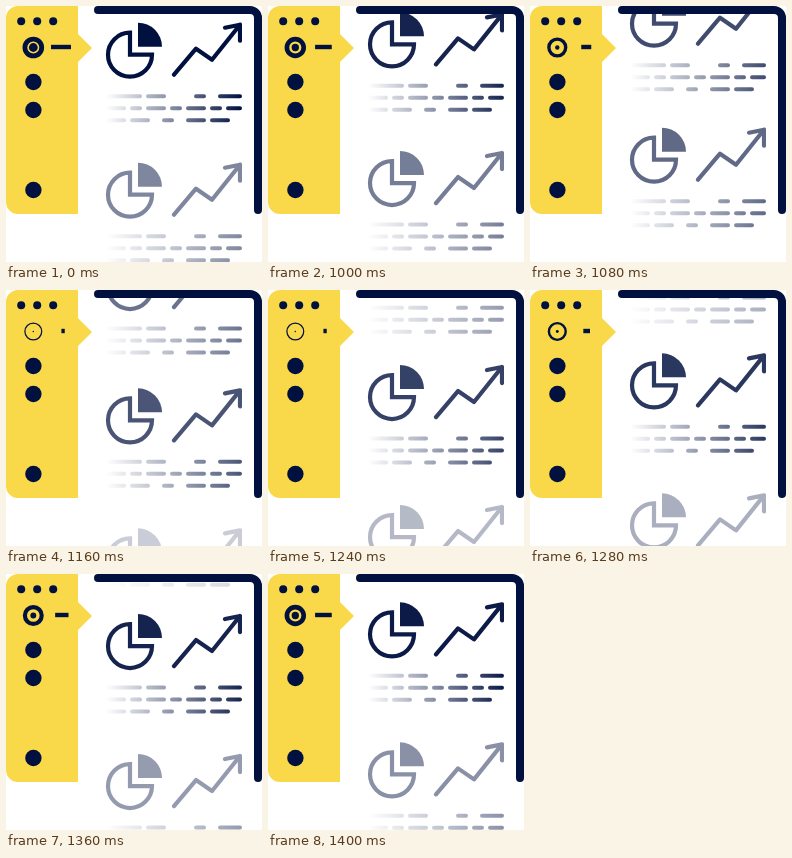
These frames come from a looping animation (256x256 px, 1440 ms). An HTML page with a canvas:

```html
<!DOCTYPE html>
<html lang="en">
<head>
<meta charset="utf-8">
<title>Scrolling report cards</title>
<style>
  html, body { margin: 0; width: 100%; height: 100%; overflow: hidden; background: #fff; }
  canvas { display: block; width: 256px; height: 256px; }
</style>
</head>
<body>
<canvas id="stage" width="256" height="256"></canvas>
<script>
const ctx = document.getElementById('stage').getContext('2d');
const NAVY = '#00103f';
const YELLOW = '#f9d949';

const LOOP = 1440, HOLD = 1000, STEP = 40, STEPS = 12;
const CARD_HEIGHT = 140;

const fade = ctx.createLinearGradient(100, 0, 236, 0);
fade.addColorStop(0, 'rgba(0, 16, 63, 0)');
fade.addColorStop(1, NAVY);

const lerp = (a, b, t) => a + (b - a) * t;

function circle(x, y, r) {
  ctx.beginPath();
  ctx.arc(x, y, r, 0, Math.PI * 2);
}

function disc(x, y, r) {
  circle(x, y, r);
  ctx.fill();
}

function strokePath(d, width) {
  ctx.lineWidth = width;
  ctx.stroke(new Path2D(d));
}

function drawIcons() {
  ctx.lineJoin = 'miter';
  strokePath('M124 48 V26 A22 22 0 1 0 146 48 Z', 4.2);
  ctx.fill(new Path2D('M132 40 V16 A24 24 0 0 1 156 40 Z'));
  ctx.lineJoin = 'round';
  strokePath('M168 68 L190 42 L206 53 L234 18 M219 21 L234 18 V34', 4.2);
}

// One row of placeholder text: a repeating dash pattern with round ends
function drawTextRow(y, pattern) {
  ctx.setLineDash(pattern);
  strokePath(`M102 ${y} H234`, 4);
}

function drawCard(y, alpha) {
  if (alpha <= 0) return;
  ctx.save();
  ctx.beginPath();
  ctx.rect(88, 8, 148, 248);
  ctx.clip();
  ctx.globalAlpha = alpha;

  ctx.translate(0, y + 0.7);
  drawIcons();

  ctx.translate(0, -0.5);
  ctx.strokeStyle = fade;
  drawTextRow(90, [32, 8, 16, 32, 8, 16]);
  drawTextRow(102, [16, 8, 8, 8]);
  drawTextRow(114, [16, 8, 16, 16, 8, 16]);
  ctx.restore();
}

// The ring and dash shrink to nothing and grow back
function drawMarker(size) {
  if (size <= 0) return;
  const x = 27.3, y = 41.5;
  disc(x, y, 4.4 * size);
  ctx.lineWidth = 4.8 * Math.sin(size * Math.PI / 2);
  circle(x, y, 8.4);
  ctx.stroke();
  ctx.fillRect(lerp(57.5, 45, size), 38.8, 20 * size, 4.4);
}

function drawPanel(size) {
  ctx.fillStyle = YELLOW;
  ctx.fill(new Path2D('M12 0 H72 V28 L86 42 L72 56 V208 H12 A12 12 0 0 1 0 196 V12 A12 12 0 0 1 12 0 Z'));

  ctx.fillStyle = NAVY;
  for (let i = 0; i < 3; i++) disc(15.2 + 16 * i, 15.3, 4);
  for (const y of [76, 104, 184]) disc(27.4, y, 8.2);
  drawMarker(size);
}

function draw(time) {
  const t = time % LOOP;
  const step = t < HOLD ? 0 : Math.floor((t - HOLD) / STEP) + 1;
  const p = step / STEPS;

  ctx.clearRect(0, 0, 256, 256);
  ctx.fillStyle = ctx.strokeStyle = NAVY;
  ctx.lineCap = 'round';

  drawCard(-124 * p, 1 - p);
  drawCard(CARD_HEIGHT * (1 - p), lerp(0.5, 1, p));
  drawCard(CARD_HEIGHT * (2 - p), 0.5 * p);

  strokePath('M92 4 H244 A8 8 0 0 1 252 12 V204', 8);
  drawPanel(Math.abs(1 - 2 * p));
}

const start = performance.now();
function tick() {
  draw(performance.now() - start);
  requestAnimationFrame(tick);
}
tick();
</script>
</body>
</html>
```
